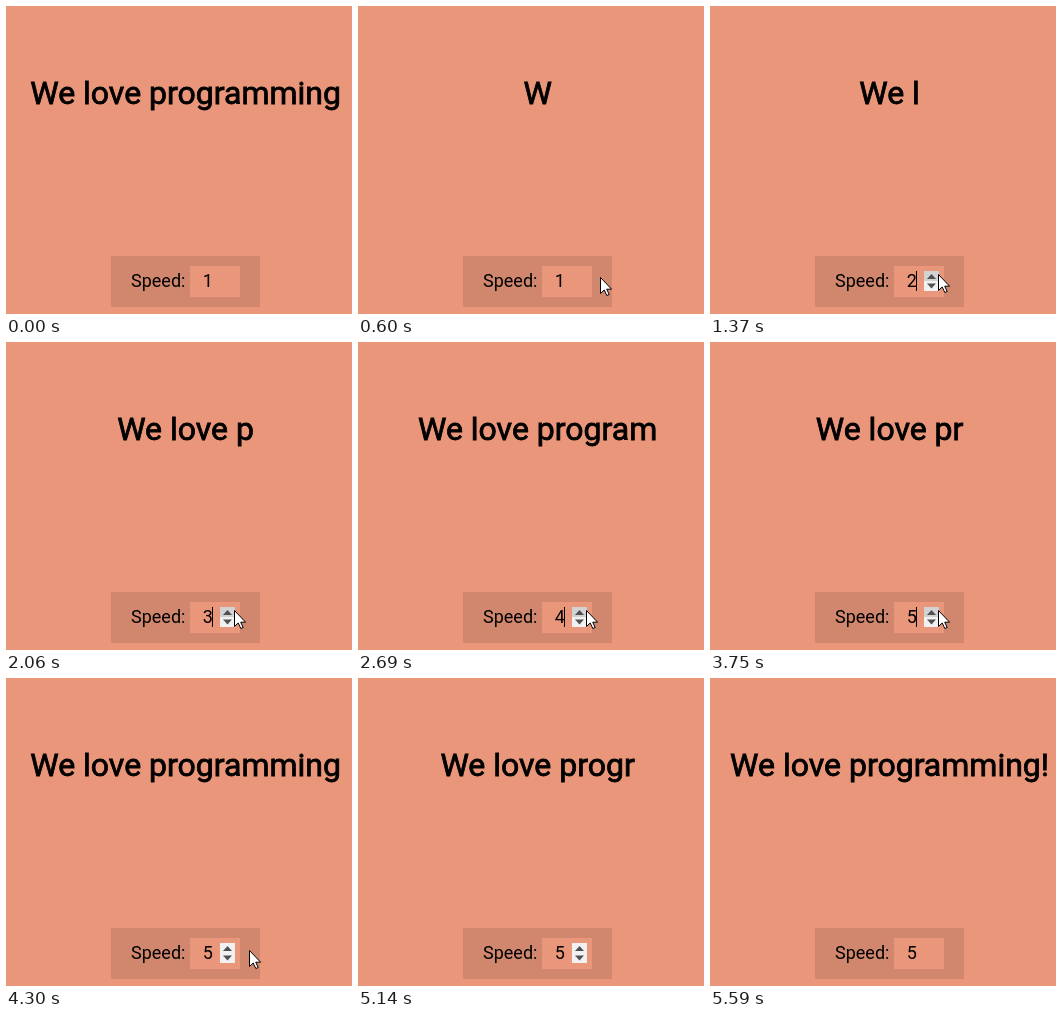
Write an HTML page that moves like this. It is 346x308 px and loops after 5.67 s.

```html
<!DOCTYPE html>
<html lang="en">
<head>
<meta charset="utf-8">
<title>Typing speed</title>
<style>
  html, body { margin: 0; width: 100%; height: 100%; overflow: hidden; background: darksalmon; }
  svg { display: block; font: 18px Roboto, sans-serif; }
  #title { font-size: 32px; text-anchor: middle; stroke: #000; stroke-width: .8px; }
</style>
</head>
<body>
<svg width="346" height="308" viewBox="0 0 346 308">
  <text id="title" x="179.6" y="98"></text>
  <rect x="105" y="250" width="149" height="51" fill="#000" fill-opacity=".1"/>
  <text x="125" y="281">Speed:</text>
  <rect x="184" y="260" width="50" height="31" fill="darksalmon"/>
  <text id="value" x="196.7" y="281"></text>
  <rect id="caret" x="206" y="265" width="1" height="20"/>
  <g id="spinner">
    <rect x="214" y="265" width="15" height="20" fill="#f1f1f1"/>
    <rect id="up" x="214" y="265" width="15" height="10"/>
    <path id="upArrow" d="M217 273h9l-4.5-5z"/>
    <path d="M217 277.500h9l-4.500 5z" fill="#505050"/>
  </g>
  <path id="cursor" d="M.5.5V16.5L4.2 13L6.8 18.500L9.2 17.500L6.7 12.2H11.6Z" fill="#fff" stroke="#000"/>
</svg>
<script>
const LOOP = 5670, STEP = LOOP / 74;   // the picture updates 74 times per loop
const MESSAGE = 'We love programming!';
const BASE = 300;                      // ms per letter at speed 1
const FOCUS = 1280, BLUR = 5300, BLINK = 500;
const $ = id => document.getElementById(id);

// Press and release time of each click on the spinner
const clicks = [
  { press: -365, release: -285 },
  { press: FOCUS, release: 1360 },
  { press: 1750, release: 1855 },
  { press: 2370, release: 2500 },
  { press: 3305, release: 3380 },
];

const progress = (t, from, to) => Math.min(1, Math.max(0, (t - from) / (to - from)));

// Glides in from the right, rests on the spinner, leaves to the lower right
function pointer(t) {
  const enter = (1 - progress(t, 60, 840)) ** 2;
  const leave = progress(t, 3940, 5060);
  return [
    Math.round(228 + 90 * enter + 100 * leave ** 1.65),
    Math.round(268 + 19 * enter + 44 * leave ** 2.1),
  ];
}

// Every release restarts the typing timer at a higher speed
function letters(t) {
  let count = MESSAGE.length - 1;
  clicks.forEach(({ release }, i) => {
    const end = Math.min(t, clicks[i + 1]?.release ?? LOOP);
    if (end > release) count += Math.floor((end - release) * (i + 1) / BASE);
  });
  return (count - 1) % MESSAGE.length + 1;
}

const show = (id, on) => $(id).setAttribute('visibility', on ? 'visible' : 'hidden');

function draw(t) {
  const value = clicks.filter(c => c.press <= t).length;
  const { press, release } = clicks[value - 1];
  const [x, y] = pointer(t);
  const focused = t >= FOCUS && t < BLUR;
  const overInput = x < 234 && y < 291;
  const overUp = x < 230 && y < 275;
  const pressed = t < release;

  $('title').textContent = MESSAGE.slice(0, letters(t)).trim();
  $('value').textContent = value;
  show('caret', focused && (t - press) % (2 * BLINK) < BLINK);
  show('spinner', focused || overInput);
  show('cursor', t > 60);
  $('up').setAttribute('fill', pressed ? '#787878' : overUp ? '#d2d2d2' : '#f1f1f1');
  $('upArrow').setAttribute('fill', pressed ? '#fff' : '#505050');
  $('cursor').setAttribute('transform', `translate(${x} ${y})`);
}

const origin = performance.now();
function tick() {
  const t = (performance.now() - origin) % LOOP;
  const step = Math.min(73, Math.floor((t + 10) / STEP));
  draw(step * STEP);
  requestAnimationFrame(tick);
}
tick();
</script>
</body>
</html>
```
